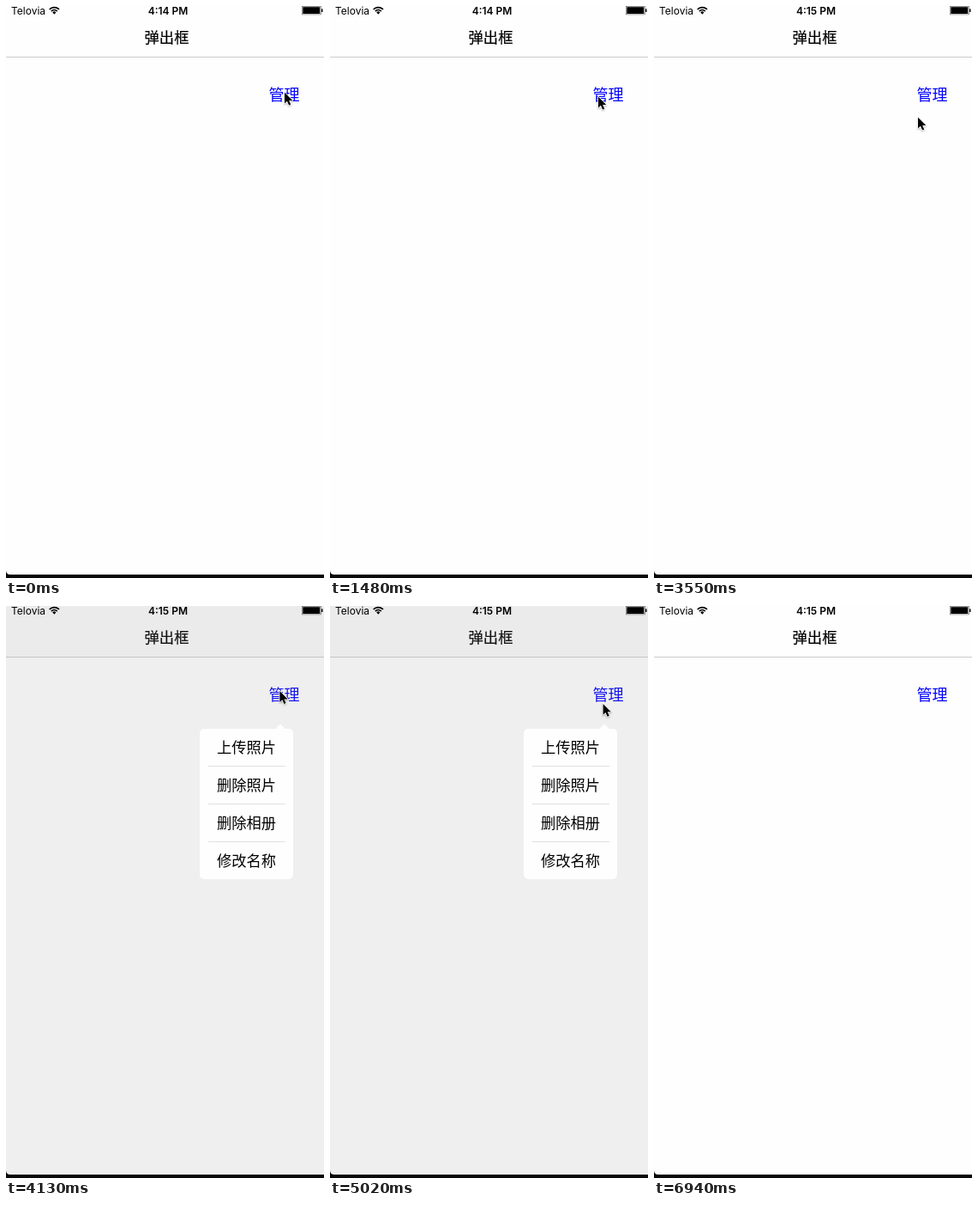
Animation, 371 px wide and 666 px high, one loop 7.04 s. Source, as an HTML page with a canvas:

```html
<!DOCTYPE html>
<html lang="zh-CN">
<head>
<meta charset="utf-8">
<title>弹出框</title>
<style>
html, body { margin: 0; width: 100%; height: 100%; overflow: hidden; background: #fefefe; }
canvas { display: block; width: 371px; height: 666px; }
</style>
</head>
<body>
<canvas id="stage" width="371" height="666"></canvas>
<script>
const ctx = document.getElementById('stage').getContext('2d');
const W = 371, H = 666, LOOP = 7040, STEP = 147.6, LAST = 47;
const CJK = '"Noto Sans CJK SC", "Noto Sans CJK", sans-serif';
const LATIN = 'Inter, Roboto, sans-serif';
const ITEMS = ['上传照片', '删除照片', '删除相册', '修改名称'];
const MENU = { right: 335, top: 143, w: 109, h: 175, row: 44 };
const CLOSE_STEPS = 2.2;

// Steps at which the menu opens and starts to close
const RUNS = [[1, 4.4], [11, 16.28], [28, 28.8], [34, 38.67]];

// Resting points of the pointer: step, x, y
const STOPS = [
  [0, 324, 99], [4, 285, 160], [10, 312, 104], [15, 283, 223], [17, 283, 223],
  [24, 307, 128], [26, 318, 97], [33, 320, 99], [39, 284, 296], [41, 284, 305],
  [43, 337, 400], [47, 20, 690]
];

const ease = p => (1 - Math.cos(Math.PI * p)) / 2;

function pointer(n) {
  const i = Math.max(1, STOPS.findIndex(s => s[0] >= n));
  const [n0, x0, y0] = STOPS[i - 1], [n1, x1, y1] = STOPS[i];
  const k = ease((n - n0) / (n1 - n0));
  return [x0 + (x1 - x0) * k, y0 + (y1 - y0) * k];
}

function menuSize(n) {
  const run = RUNS.find(([open, close]) => n >= open && n < close + CLOSE_STEPS - 0.01);
  return run ? 1 - ease(Math.max(0, n - run[1]) / CLOSE_STEPS) : 0;
}

function rect(x, y, w, h, color) {
  ctx.fillStyle = color;
  ctx.fillRect(x, y, w, h);
}

function text(str, x, y, font, color, align = 'center') {
  ctx.font = font;
  ctx.textAlign = align;
  ctx.fillStyle = color;
  ctx.fillText(str, x, y);
}

function page() {
  rect(0, 0, W, H, '#fefefe');
  rect(0, 59, W, 1, '#ccc');
  text('弹出框', 187.5, 43.2, '17.3px ' + CJK, '#000');
  ctx.lineWidth = 0.2;
  ctx.strokeStyle = '#000';
  ctx.strokeText('弹出框', 187.5, 43.2);
  text('管理', 324.5, 110.4, '18px ' + CJK, '#00f');
}

function shade(k) {
  rect(0, 0, W, H, `rgba(145,145,145,${0.138 * k})`);
  rect(0, 0, W, 59, `rgba(0,0,0,${0.017 * k})`);
}

function statusBar(minute) {
  text('Telovia', 6, 10, '12px ' + LATIN, '#000', 'left');
  text('4:' + minute + ' PM', 189, 10, '600 12px ' + LATIN, '#000');
  ctx.strokeStyle = '#000';
  ctx.lineWidth = 1.7;
  for (const r of [4.7, 7.7]) {
    ctx.beginPath();
    ctx.arc(56.3, 9.3, r, -Math.PI * 0.76, -Math.PI * 0.24);
    ctx.stroke();
  }
  ctx.beginPath();
  ctx.moveTo(56.3, 9.8);
  ctx.arc(56.3, 9.3, 2.8, -Math.PI * 0.76, -Math.PI * 0.24);
  ctx.fillStyle = '#000';
  ctx.fill();
  ctx.lineWidth = 0.6;
  ctx.strokeStyle = '#555';
  ctx.strokeRect(345.3, 0.3, 22, 9.6);
  rect(346.3, 1.2, 20, 7.8, '#000');
  rect(368.1, 3.4, 1.4, 3.6, '#000');
}

function menu(size) {
  const { right, top, row } = MENU;
  const w = MENU.w * size, h = MENU.h * size, left = right - w;
  const closing = size < 1;
  ctx.fillStyle = '#fefefe';
  ctx.beginPath();
  ctx.moveTo(314.5, top);
  ctx.lineTo(320, 137.5);
  ctx.lineTo(325.5, top);
  ctx.fill();
  ctx.save();
  ctx.beginPath();
  ctx.roundRect(left, top, w, h, 5);
  ctx.fill();
  ctx.clip();
  ITEMS.forEach((item, i) => {
    const y = top + i * row;
    if (closing) {
      for (const dx of [-1, 4.5]) rect(left + dx, y + 25.7, 1.7, 1.6, '#222');
    } else {
      text(item, 280.5, y + 27.8, '17.3px ' + CJK, '#000');
    }
    if (i < 3) rect(closing ? left : 236, y + 43, closing ? 10 : 90, 1, '#e0e0e0');
  });
  ctx.restore();
}

function bezel() {
  ctx.fillStyle = '#080606';
  ctx.beginPath();
  ctx.moveTo(0, 657);
  ctx.quadraticCurveTo(0, 662, 5, 662);
  ctx.lineTo(W, 662);
  ctx.lineTo(W, H);
  ctx.lineTo(0, H);
  ctx.fill();
}

function arrow(x, y) {
  const outline = new Path2D('M0 0V15L3.4 11.8L5.9 17.3L8.4 16.2L6 10.9H10.8Z');
  ctx.save();
  ctx.translate(x + 1, y + 1.7);
  ctx.scale(0.86, 0.86);
  ctx.shadowColor = 'rgba(0,0,0,.3)';
  ctx.shadowBlur = 2;
  ctx.shadowOffsetY = 1;
  ctx.lineWidth = 1.8;
  ctx.lineJoin = 'round';
  ctx.strokeStyle = '#fff';
  ctx.stroke(outline);
  ctx.shadowColor = 'transparent';
  ctx.fillStyle = '#000';
  ctx.fill(outline);
  ctx.restore();
}

function draw(t) {
  const n = Math.min(LAST, Math.floor((t + 8) / STEP));
  const size = menuSize(n);
  page();
  shade(size);
  statusBar(n < 12 ? 14 : 15);
  if (size) menu(size);
  bezel();
  arrow(...pointer(n));
}

const start = performance.now();
function tick() {
  draw((performance.now() - start) % LOOP);
  requestAnimationFrame(tick);
}
tick();
</script>
</body>
</html>
```
